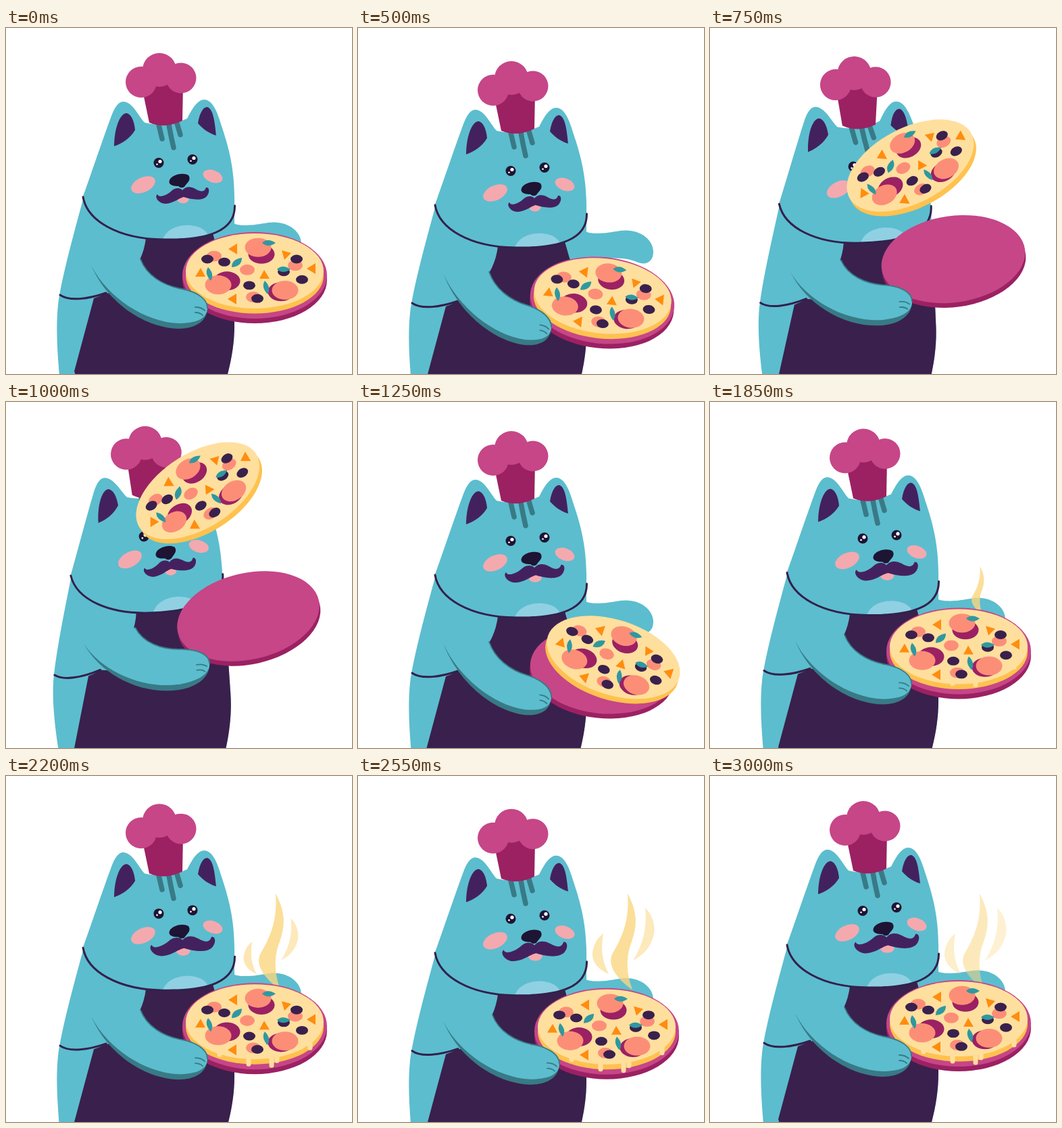
These frames come from a looping animation (512x512 px, 3.05 s). An HTML page:

```html
<!DOCTYPE html>
<html lang="en">
<head>
<meta charset="utf-8">
<title>Pizza chef</title>
<style>
html, body { margin: 0; width: 100%; height: 100%; overflow: hidden; background: #fff; }
svg { display: block; width: 100vw; height: 100vh; }
.teal { fill: #5cbdce; }
.dark { fill: #3a204d; }
.purple { fill: #43215f; }
.ink { fill: #1e1433; }
.rose { fill: #c64687; }
.wine { fill: #9b2163; }
.pink { fill: #f4a9af; }
.cream { fill: #ffdf9e; }
.crust { fill: #ffc24f; }
.carrot { fill: #ff8d0e; }
.leaf { fill: #2f98a0; }
.shade { fill: #387a86; }
.steam { fill: #fbd67f; }
.line, .hair, .edge, .drip, .dots { fill: none; stroke-linecap: round; }
.line { stroke: #33204c; stroke-width: 3; }
.hair { stroke: #387a86; stroke-width: 7.5; }
.edge { stroke: #387a86; stroke-width: 1.8; }
.drip { stroke: #ffdf9e; stroke-width: 7; }
</style>
</head>
<body>
<svg viewBox="0 0 512 512">
  <g id="body">
    <path class="teal" d="M330 286C345 296 370 291 388 288C415 284 437 300 437 319C437 335 425 340 412 334C390 325 360 330 310 330Z"/>
    <path class="teal" d="M115 250C100 305 81 375 77 410C73 450 77 490 81 540H320L328 512C333 490 338 470 338 440V262Z"/>
    <path class="dark" d="M207 311Q205 328 198 343L170 395L148 392Q139 397 130 400L101 508L112 540H320L328 512C334 490 338 465 338 440V395Q318 350 306 304Z"/>
    <path class="line" d="M80 395C94 405 122 401 148 392"/>
    <path class="teal" d="M114 249C128 210 143 165 156 130C162 114 168 108 175 109C188 111 196 130 205 140Q236 148 268 134C276 118 284 106 293 106C306 106 313 125 319 145C330 178 339 210 338 262C338 300 300 314 233 313C165 312 120 285 114 249Z"/>
    <path d="M232 313C240 287 288 285 299 306Q270 313 232 313Z" fill="#90d0e3"/>
    <path class="line" d="M114 250C120 285 165 312 233 313C300 314 339 300 338.500 263"/>
    <path class="purple" d="M160 175C160 150 168 127 178 126C186 127 190 140 191 151C184 163 172 171 160 175Z"/>
    <path class="purple" d="M284 141C287 124 292 117 298 117C307 120 309 140 311 159C300 156 291 149 284 141Z"/>
    <path class="hair" d="M226 143L231 164M241 143Q244 160 248 177M253 141L258 158"/>
    <g id="hat">
      <path class="wine" d="M202 92L212 140Q236 150 261 137L262 85L228 76Z"/>
      <circle class="rose" cx="200" cy="80" r="23"/>
      <circle class="rose" cx="227" cy="62" r="25"/>
      <circle class="rose" cx="259" cy="74" r="22.500"/>
    </g>
    <g id="eye">
      <circle class="ink" cx="226" cy="199.500" r="7.500"/>
      <circle cx="228" cy="197.500" r="2.600" fill="#fff"/>
      <circle cx="223.500" cy="201.700" r="1.300" fill="#fff"/>
    </g>
    <use href="#eye" x="50" y="-5"/>
    <ellipse class="pink" cx="203" cy="232" rx="19" ry="11" transform="rotate(-25 203 232)"/>
    <ellipse class="pink" cx="306" cy="219.500" rx="15" ry="9" transform="rotate(20 306 219.500)"/>
    <path class="ink" d="M241.500 227C243 217 262 213 270 218C275 225 267 230 264 235Q259 238 255 234C249 234 241 233 241.500 227Z"/>
    <g id="mouth">
      <ellipse class="pink" cx="262" cy="253.500" rx="8.500" ry="6"/>
      <path class="purple" d="M224 246C226 252 238 248 246 240C252 235 259 237 261 240C266 234 273 234 280 238C288 243 294 243 296 236C301 235 302 243 297 249C290 257 272 253 263 250C255 252 249 259 236 260C226 260 219 250 224 246Z"/>
    </g>
  </g>
  <g id="steam">
    <path id="steamMid" class="steam" d="M399 174C413 200 414 220 405 245C395 270 398 295 406 316C385 302 367 280 377 262C390 240 402 215 399 174Z"/>
    <path id="steamLeft" class="steam" opacity=".75" d="M363 233C360 250 359 270 371 293C352 285 346 272 347 261C349 248 355 239 363 233Z"/>
    <path id="steamRight" class="steam" opacity=".65" d="M425 195C436 206 440 220 438 234C434 253 422 265 407 273C422 248 428 225 425 195Z"/>
  </g>
  <g id="plate">
    <ellipse class="wine" cx="368" cy="373" rx="107" ry="64"/>
    <ellipse class="rose" cx="368" cy="366" rx="107" ry="64"/>
  </g>
  <g id="pizza">
    <ellipse class="crust" cx="368" cy="367" rx="102" ry="55.500"/>
    <path id="drips" class="drip" d="M316 385V408M359 385V422M393 385V424M401 385V417M450 370V398"/>
    <ellipse class="cream" cx="368" cy="359.500" rx="102" ry="55.500"/>
    <!-- Round toppings, seen at the tilt of the plate -->
    <g class="dots" transform="translate(368 360) scale(1 .72)">
      <path stroke="#fc8e78" stroke-width="22" d="M-60-31h0M-11-3h0M60-12h0M-2 53h0"/>
      <path stroke="#9b2163" stroke-width="39" d="M10-35h0M-41 20h0M39 42h0"/>
      <path stroke="#fc8e78" stroke-width="39" d="M5-49h0M-54 28h0M45 39h0"/>
      <path stroke="#3a204d" stroke-width="18" d="M-70-25h0M-45-19h0M62-25h0M43 1h0M70 17h0M-8 29h0M4 56h0"/>
    </g>
    <path class="carrot" d="M329 327l13-8v16zM445 356l13-8v16zM328 401l13-8v16zM375 371l7-13 8 13zM280 368l8-13 7 13zM408 329l14 4-10 10z"/>
    <path class="leaf" d="M379 318q8-8 20 0-11 8-20 0zM401 357q8-8 20 0-11 8-20 0zM334 354q0-12 15-14 0 13-15 14zM299 354q-6 9 4 20 6-10-4-20zM383 374q-6 9 4 20 6-10-4-20z"/>
  </g>
  <g id="arm">
    <path class="shade" d="M127 353L260 400L298 414C298 434 280 445 255 445C200 443 148 402 127 353Z"/>
    <path class="teal" d="M127 353L199 342C208 366 232 381 260 386C285 391 298 402 298 414C298 431 280 437 255 437C205 435 150 398 127 353Z"/>
    <path class="edge" d="M199 342C208 366 232 381 260 386C285 391 298 402 298 414"/>
    <path class="edge" d="M280 413Q289 413 294 418M280 421Q287 421 291 425"/>
  </g>
</svg>
<script>
const LOOP = 3050, STEP = 50, SLACK = 16;
const $ = id => document.getElementById(id);
const move = (id, value) => $(id).setAttribute('transform', value);

// Eased 0 to 1 between two times, and a rise followed by a fall
function ramp(t, from, to) {
  const u = Math.min(1, Math.max(0, (t - from) / (to - from)));
  return u * u * (3 - 2 * u);
}
const pulse = (t, a, b, c, d) => ramp(t, a, b) - ramp(t, c, d);

const LOW = [-6.5, 25, 6], HIGH = [-9.5, -49, -13];
const FLIGHT = [-92, -200, -30], SLIP = [14.5, -13, 12];
const TOSS = 680, LAND = 1250;

function flight(t) {
  const u = (t - TOSS) / (LAND - TOSS);
  return u > 0 && u < 1 ? Math.sin(Math.PI * u ** 0.7) : 0;
}

// Weighted sum of two [x, y, turn] poses
const mix = (a, wa, b, wb) => a.map((v, i) => v * wa + b[i] * wb);

const limbs = [...$('arm').children].map(el => ({ el, d: el.getAttribute('d') }));

// The pull of the hand fades out towards the shoulder
function reach(dx, dy) {
  for (const { el, d } of limbs)
    el.setAttribute('d', d.replace(/(\d+) (\d+)/g, (_, x, y) => {
      const w = (x - 127) / 171;
      return `${+x + dx * w} ${+y + dy * w}`;
    }));
}

function grow(id, x, y, size) {
  move(id, `translate(${x} ${y}) scale(${size}) translate(${-x} ${-y})`);
}

function draw(t) {
  const bob = 6 * (1 - Math.cos(t / 1000 * 2 * Math.PI));
  const low = pulse(t, 0, 500, 570, 820) + pulse(t, 1000, 1220, 1300, 1700);
  const high = pulse(t, 570, 850, 1000, 1200);
  const lean = pulse(t, 560, 880, 1000, 1180);

  const leaning = `translate(0 ${bob}) rotate(${-3.9 * lean} 208 520)`;
  move('body', leaning);
  move('arm', leaning);
  move('hat', `rotate(${7 * lean} 235 145)`);
  reach(12 * (high - low), 16 * low - 21 * high);

  const grin = 0.13 * ramp(t, 1050, 1250) + 0.1 * ramp(t, 1250, 2300);
  move('mouth', `translate(261 247) scale(${1 + grin} ${1 + grin * 0.8}) translate(-261 -247)`);

  const plate = mix(LOW, low, HIGH, high);
  const toss = mix(FLIGHT, flight(t), SLIP, pulse(t, 700, LAND, LAND, 1400));
  const dish = ([x, y, turn]) => `translate(${x} ${y + bob}) rotate(${turn} 368 366)`;
  move('plate', dish(plate));
  move('pizza', dish(mix(plate, 1, toss, 1)));
  move('drips', `translate(0 ${20 * (ramp(t, 1650, 2000) - 1)})`);

  const side = ramp(t, 1830, 2350);
  grow('steamMid', 400, 312, ramp(t, 1650, 2050));
  grow('steamLeft', 370, 293, side);
  grow('steamRight', 408, 272, side);
  $('steam').style.opacity = 0.8 - 0.28 * ramp(t, 2500, LOOP);
}

// Poses hold for one step; the slack absorbs the delay of the first display frame
const begin = performance.now();
function tick() {
  const t = performance.now() - begin + SLACK;
  draw(Math.floor(t / STEP) * STEP % LOOP);
  requestAnimationFrame(tick);
}
tick();
</script>
</body>
</html>
```
